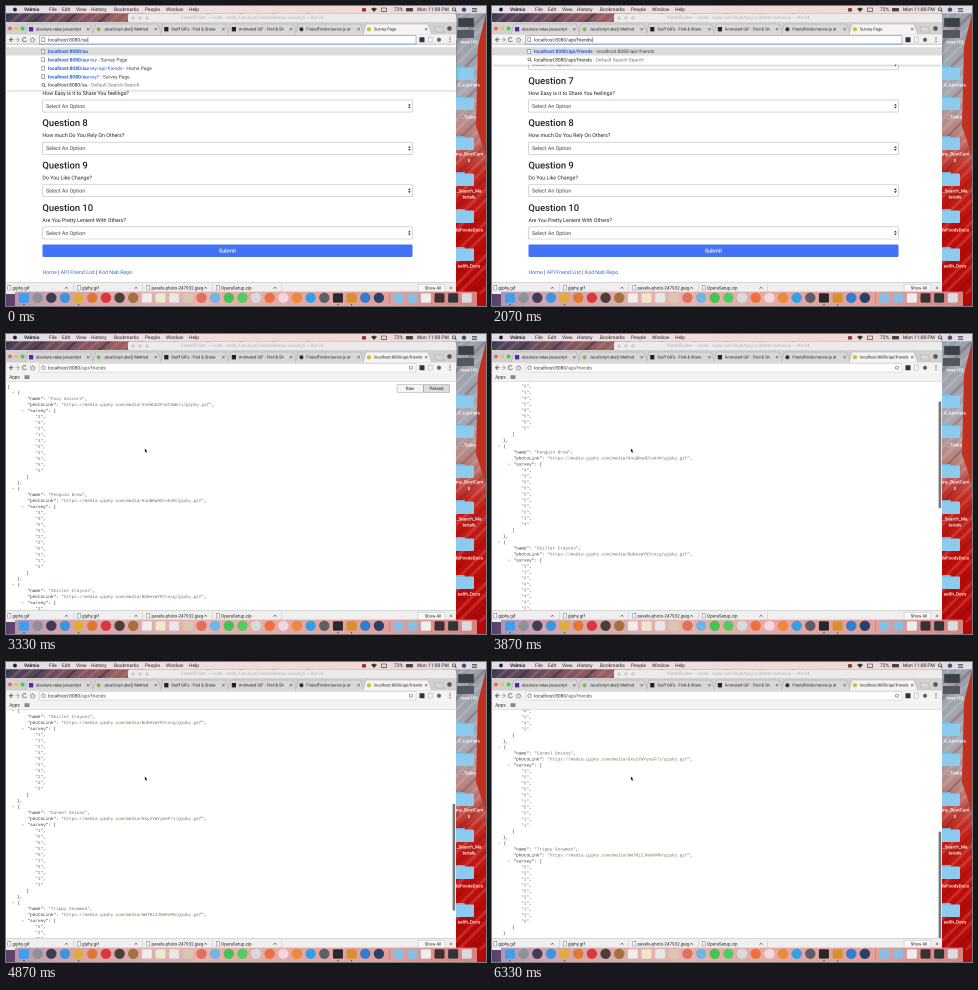
Animation of 480x300 px, one loop 6.39 s. Source, as an HTML page with a canvas:

```html
<!DOCTYPE html>
<html lang="en">
<head>
<meta charset="utf-8">
<title>Friend finder demo</title>
<style>
html, body { margin: 0; width: 100%; height: 100%; overflow: hidden; }
canvas { display: block; width: 480px; height: 300px; }
</style>
</head>
<body>
<canvas id="stage" width="960" height="600"></canvas>
<script>
const ctx = document.getElementById('stage').getContext('2d');
// Double resolution keeps the tiny text smooth.
ctx.scale(2, 2);
ctx.textRendering = 'geometricPrecision';
const LOOP = 6390, STEP = 1000 / 15;
const SANS = 'Roboto, sans-serif', MONO = '"Liberation Mono", monospace';
const HOST = 'localhost:8080/';
const BLUE = '#2f62d9', INK = '#222', STRING = '#6c7758';

function box(x, y, w, h, fill, stroke, radius = 0) {
  ctx.beginPath();
  ctx.roundRect(x, y, w, h, radius);
  if (fill) { ctx.fillStyle = fill; ctx.fill(); }
  if (stroke) { ctx.strokeStyle = stroke; ctx.lineWidth = 0.6; ctx.stroke(); }
}

function dot(x, y, r, fill) {
  ctx.fillStyle = fill;
  ctx.beginPath();
  ctx.arc(x, y, r, 0, 7);
  ctx.fill();
}

function ring(x, y, r, color, from = 0, to = 7) {
  ctx.strokeStyle = color;
  ctx.lineWidth = 0.7;
  ctx.beginPath();
  ctx.arc(x, y, r, from, to);
  ctx.stroke();
}

function path(points, stroke, width = 0.8, fill) {
  ctx.beginPath();
  points.forEach(([x, y]) => ctx.lineTo(x, y));
  if (fill) { ctx.fillStyle = fill; ctx.closePath(); ctx.fill(); }
  if (stroke) { ctx.strokeStyle = stroke; ctx.lineWidth = width; ctx.stroke(); }
}

function cross(x, y) {
  path([[x, y], [x + 2.4, y + 2.4]], '#666', 0.6);
  path([[x + 2.4, y], [x, y + 2.4]], '#666', 0.6);
}

// Linear gradient along x or y from [offset, color] stops.
function blend(w, h, stops) {
  const gradient = ctx.createLinearGradient(0, 0, w, h);
  stops.forEach(([offset, color]) => gradient.addColorStop(offset, color));
  return gradient;
}

// Draws text centred on y and returns the x where it ends.
function text(s, x, y, { size = 4.9, color = INK, weight = 400, font = SANS, align = 'left' } = {}) {
  ctx.font = `${weight} ${size}px ${font}`;
  ctx.fillStyle = color;
  ctx.textAlign = align;
  ctx.textBaseline = 'middle';
  ctx.fillText(s, x, y);
  return x + ctx.measureText(s).width;
}

function clip(x, y, w, h, draw) {
  ctx.save();
  ctx.beginPath();
  ctx.rect(x, y, w, h);
  ctx.clip();
  draw();
  ctx.restore();
}

// Last value whose step has been reached.
const at = (list, k) => list.reduce((value, [start, next]) => k >= start ? next : value, list[0][1]);

function between(list, k) {
  const i = list.findIndex(([start]) => start > k);
  if (i < 0) return list[list.length - 1][1];
  if (i === 0) return list[0][1];
  const [k0, v0] = list[i - 1], [k1, v1] = list[i];
  return v0 + (v1 - v0) * (k - k0) / (k1 - k0);
}

const TYPED = [[0, 'su'], [1, 's'], [2, ''], [6, 'a'], [7, 'ap'], [8, 'api'], [10, 'api/'], [22, 'api/f'],
  [28, 'api/fr'], [29, 'api/fri'], [30, 'api/frien'], [31, 'api/friends']];
const SCROLL = [[54, 0], [55, 4], [58, 42.5], [61, 97], [65, 167], [68, 192], [71, 202], [75, 202],
  [76, 206], [79, 238], [82, 254.5], [86, 259], [92, 261], [95, 261.5]];
const CLOSED = 37, LOADED = 39, POINTER = 45, SCROLLING = 55;

function desktop() {
  box(0, 0, 480, 300, blend(0, 300, [[0, '#96a0ac'], [0.28, '#a9a7b0'], [0.42, '#b98580'],
    [0.55, '#c3251d'], [0.75, '#c00d0a'], [1, '#b00707']]));
  box(0, 0, 140, 20, blend(140, 0, [[0, '#433e58'], [0.5, '#7d5262'], [1, '#a5655f']]));
  for (let i = 0; i < 30; i++) {
    const x = i * 11;
    path([[x - 8, 18], [x + 8, 4]], i % 3 ? '#e0908340' : '#2c2c4280', 2.5);
    path([[440, i * 11 + 14], [490, i * 11 - 36]], i % 3 ? '#ffffff22' : '#5a141433', 3);
  }
  path([[480, 8], [480, 150], [470, 120], [472, 40]], null, 0, '#c0301f');
  box(452, 12, 16, 9, '#3a3f48', '#777');
  box(451, 24, 17, 8, '#55575e');
  const labels = ['iews.HQ', '0_tutorials', '_Tasks', 'any_BootCam|p', '_Search_Ma|terials', 'deFoodsDocs', 'ealth_Docs'];
  const tops = [0, 60, 90, 130, 166, 203, 241], rows = [36, 79, 111, 148, 185, 224, 260];
  labels.forEach((label, i) => {
    if (i) {
      box(450, tops[i], 9, 4, '#73b9df', null, 1);
      box(449, tops[i] + 1.5, 19, 12.5, '#8ccbed', null, 1);
    }
    label.split('|').forEach((line, j) =>
      text(line, 463, rows[i] + j * 6, { size: 4.6, color: '#fff', weight: 500, align: 'center' }));
  });
}

function menuBar() {
  box(0, 0, 480, 7.3, blend(480, 0, [[0, '#e3dde6'], [0.3, '#efe0e2'], [0.7, '#f4d8d2'], [0.85, '#ecdadb'], [1, '#dfe0e8']]));
  dot(9, 3.5, 1.9, '#222');
  text('Velmio', 18, 3.8, { weight: 700 });
  const items = { File: 43, Edit: 56, View: 70, History: 85, Bookmarks: 108, People: 139, Window: 160, Help: 183 };
  for (const name in items) text(name, items[name], 3.8);
  box(356, 2, 4, 3.6, '#8c3a32', null, 1);
  path([[365, 2.8], [368, 1.5], [371, 2.8], [368, 6]], null, 0, '#333');
  box(375.5, 2, 5, 3.4, null, '#333');
  text('72%', 388, 3.8);
  box(400, 2, 7, 3.4, '#444', null, 0.6);
  text('Mon 11:08 PM', 411, 3.8);
  ring(448, 3.3, 1.5, '#333');
  path([[449, 4.4], [450.4, 5.8]], '#333');
  dot(458, 3.7, 2.2, '#454b80');
  for (let i = 0; i < 3; i++) box(466, 2 + i * 1.6, 5, 0.7, '#333');
}

function terminalTitle() {
  box(122, 7.6, 328, 9, '#eceaeb', null, 2);
  [127, 134, 141].forEach(x => dot(x, 12, 1.8, '#cfcdce'));
  text('FriendFinder — node - node /usr/local/bin/nodemon server.js — 80×24', 175, 11.8, { size: 4.6, color: '#b5b3b4' });
}

function tabs(title) {
  box(0, 16, 450, 13, '#d2d0d1', null, 2);
  ['#f6605a', '#f8bd3c', '#40c84c'].forEach((color, i) => dot(4 + i * 6.3, 22.5, 1.9, color));
  const titles = ['absolute value javascript', 'JavaScript abs() Method', 'Stuff GIFs - Find & Share', 'Animated GIF - Find & Sh',
    'FriendFinder/server.js at', title];
  const icons = ['#5d20b5', '#7fbd4a', '#222', '#222', '#333', '#cbbd35'];
  titles.forEach((name, i) => {
    const x = 20 + i * 67.6, active = i === 5;
    path([[x - 1, 28.6], [x + 2, 18], [x + 64, 18], [x + 68, 28.6]], '#aaa8a9', 0.5, active ? '#f5f4f5' : '#d9d7d8');
    if (i === 1 || i > 3) dot(x + 5, 23.2, 2, icons[i]);
    else box(x + 3, 21, 4.2, 4.4, icons[i]);
    text(name, x + 10, 23.4, { size: 4.1 });
    cross(x + 61, 22);
  });
  path([[428, 21], [436, 21], [438, 26], [430, 26]], '#aaa', 0.5, '#d9d7d8');
  dot(443.5, 22.5, 2.3, '#555');
}

function toolbar(address, focused) {
  box(0, 28.5, 450, 18.8, '#f4f3f4');
  path([[6, 31.5], [3.5, 33.7], [6, 36]], '#555');
  path([[3.5, 33.7], [7.5, 33.7]], '#555');
  path([[9.5, 33.7], [13.5, 33.7]], '#aaa');
  path([[11, 31.5], [13.5, 33.7], [11, 36]], '#aaa');
  ring(18.5, 33.7, 2.1, '#555', 0.4, 5.6);
  path([[24, 34], [26.5, 31.6], [29, 34], [28, 34], [28, 36], [25, 36], [25, 34]], '#777', 0.6);
  box(33.5, 29.4, 376.5, 8.7, '#fff', focused ? '#5b97e8' : '#ccc', 1);
  if (focused) pageIcon(37, 33.7);
  else ring(37.5, 33.7, 1.7, '#777');
  const end = text(HOST, 42, 34, { color: '#333' });
  const caret = text(address, end, 34, { color: focused ? INK : '#555' });
  if (focused) box(caret + 0.3, 31.3, 0.5, 5, '#333');
  else ring(405, 33.7, 1.5, '#777');
  box(413.5, 31.2, 5, 5, '#333', null, 0.6);
  box(422.5, 31.2, 3.6, 4.8, '#fff', '#aaa');
  dot(433, 33.7, 2, '#666');
  [31.7, 33.7, 35.7].forEach(y => dot(444, y, 0.6, '#555'));
  text('Apps', 3.2, 43.2, { size: 4.6 });
  box(18.5, 41.2, 5, 3.8, '#888', null, 0.6);
  box(0, 47, 450, 0.5, '#c8c8c8');
}

function pageIcon(x, y) {
  box(x - 1.2, y - 2, 2.8, 4, '#fff', '#777');
}

function suggestions(typed) {
  const match = HOST + typed;
  const search = [match, ' - Default Search Search', true];
  const friends = [HOST + 'api/friends', ' - localhost:8080/api/friends'];
  const rows = typed[0] === 'a' ? [friends, search] : [
    [match, ''], [HOST + 'survey', ' - Survey Page'], [HOST + 'survey/api/friends', ' - Home Page'],
    [HOST + 'survey?', ' - Survey Page'], search];
  ctx.save();
  ctx.shadowColor = '#0005';
  ctx.shadowBlur = 6;
  box(0, 39, 450, 8.45 * rows.length + 2.9, '#fff');
  ctx.restore();
  box(0, 41.2, 450, 8.3, '#dcdcdc');
  rows.forEach(([url, note, isSearch], i) => {
    const y = 45.5 + i * 8.45;
    let x = 42;
    if (isSearch) {
      ring(37.3, y - 0.6, 1.4, '#666');
      path([[38.3, y + 0.4], [39.7, y + 1.8]], '#666');
      x = text(url, x, y);
    } else {
      pageIcon(37, y - 0.2);
      x = text(url.slice(0, match.length), x, y, { color: BLUE, weight: 700 });
      x = text(url.slice(match.length), x, y, { color: BLUE });
    }
    text(note, x, y, { color: isSearch ? '#777' : '#444' });
  });
}

function surveyPage() {
  const labels = ['', 'How Easy is it to Share You feelings?', 'How much Do You Rely On Others?', 'Do You Like Change?',
    'Are You Pretty Lenient With Others?'];
  labels.forEach((label, i) => {
    const y = 32.8 + i * 42.3;
    text('Question ' + (6 + i), 36.4, y, { size: 9.4, weight: 500 });
    text(label, 36.4, y + 12.2, { size: 5.3 });
    box(36.6, y + 18.8, 369.8, 12.2, '#fff', '#b9bcc0', 1);
    text('Select An Option', 40, y + 25.2, { size: 5.3, color: '#444' });
    path([[402, y + 24.4], [403.4, y + 22.6], [404.8, y + 24.4]], null, 0, '#333');
    path([[402, y + 25.6], [403.4, y + 27.4], [404.8, y + 25.6]], null, 0, '#333');
  });
  box(36.5, 238.5, 370, 12.5, '#4272f5', null, 1.2);
  text('Submit', 221.5, 245.1, { size: 5.4, color: '#fff', weight: 500, align: 'center' });
  let x = 36.5;
  ['Home', 'API Friend List', 'Kod Nab Repo'].forEach((link, i) => {
    if (i) x = text(' | ', x, 266.3, { size: 5.3 });
    x = text(link, x, 266.3, { size: 5.3, color: '#3570c4' });
  });
}

const FRIENDS = [
  ['Foxy Unicorn', '3XAHUUZFxGtGWmli', '3421424552'],
  ['Penguin Brow', 'H4uBRwHDlnK4M', '4355225214'],
  ['Skillet Crayons', 'BUBesWYR7cnzg', '3124344242'],
  ['Carmel Onions', '6XuzYWYyeeF7i', '1555515211'],
  ['Trippy Snowman', 'mWTRi2JHeRVMH', '5212521124'],
];

function jsonPage(scroll) {
  const mono = (s, x, y, color = '#333') => text(s, x, y, { size: 4.33, color, font: MONO });
  const fold = (x, y) => path([[x, y - 0.7], [x + 1.8, y - 0.7], [x + 0.9, y + 0.8]], null, 0, '#aaa');
  const pair = (key, value, y) => mono(',', mono(`"${value}"`, mono(`"${key}": `, 21.5, y), y, STRING), y);
  const top = 52.9 - scroll;
  mono('[', 1.5, top);
  FRIENDS.forEach(([name, id, answers], i) => {
    const y = top + 6 + i * 96, last = i === FRIENDS.length - 1;
    fold(6.3, y);
    mono('{', 11.5, y);
    pair('name', name, y + 6);
    pair('photoLink', `https://media.giphy.com/media/${id}/giphy.gif`, y + 12);
    fold(16, y + 18);
    mono('"survey": [', 21.5, y + 18);
    [...answers].forEach((answer, j) => {
      const end = mono(`"${answer}"`, 29.3, y + 24 + j * 6, STRING);
      if (j < 9) mono(',', end, y + 24 + j * 6);
    });
    mono(']', 20.2, y + 84);
    mono(last ? '}' : '},', 11, y + 90);
  });
  box(391, 50.5 - scroll, 26.5, 8, '#f5f5f5', '#aaa', 1);
  box(417.5, 50.5 - scroll, 26, 8, '#dcdcdc', '#999', 1);
  text('Raw', 404, 54.7 - scroll, { size: 4.5, align: 'center' });
  text('Parsed', 430.5, 54.7 - scroll, { size: 4.5, align: 'center' });
}

function downloads() {
  box(0, 276, 450, 13, '#f0eff0');
  box(0, 276, 450, 0.5, '#bbb');
  ['giphy.gif', 'giphy.gif', 'pexels-photo-247932.jpeg', 'OperaSetup.zip'].forEach((file, i) => {
    const x = i * 69.5;
    box(x + 1.8, 279.6, 3, 4.4, '#fff', '#888');
    text(file, x + 6.5, 282, { size: 4.5 });
    path([[x + 59, 282.6], [x + 60.5, 281.2], [x + 62, 282.6]], '#666', 0.7);
    box(x + 67, 278, 0.5, 9, '#c3c3c3');
  });
  box(412, 278.2, 27, 8, '#f8f8f8', '#c5c5c5', 1);
  text('Show All', 427, 282.3, { size: 4.3, align: 'center' });
  cross(443.8, 280.7);
}

const APPS = ('#3d9ff0 #8d9198 #3f3a55 #3c96dc #e0ae35 #e27830 #d9373d #4a4038 #a5703b #f1ecec #f0e8cc #e7e7ea #d8c8b0 '
  + '#e0705a #6fb4e6 #46c354 #52cb61 #d5dbdd #f0703d #f2d5dd #ef8639 #34a0e9 #5c5f65 #26282d #d8902f #2f7fd0 #28406a '
  + '#83c0e4 #83c0e4 #eceef0 #3a3032 #2f3437 #d9dde2').split(' ');

function dock() {
  box(0, 288, 480, 12, blend(480, 0, [[0, '#4c4470'], [0.04, '#8a4a66'], [0.3, '#b8524f'], [1, '#b50a08']]));
  const glass = blend(480, 0, [[0, '#a894b4'], [0.1, '#d3a3ae'], [0.4, '#e6b3ae'], [0.8, '#e2a09c'], [1, '#d67f7c']]);
  box(9, 285.6, 462, 15, glass, null, 1);
  APPS.forEach((color, i) => {
    const x = 18 + i * 13.65 + (i > 26 ? 6 : 0);
    const square = i === 0 || (i > 8 && i < 13) || i === 23 || i === 24 || i > 26;
    if (square) box(x - 5, 287.2, 10, 9.4, color, null, 1.2);
    else dot(x, 291.8, 5.2, color);
    if ([0, 4, 23, 24].includes(i)) dot(x, 298.9, 0.6, '#222');
  });
  box(383, 287, 0.6, 11, '#a77');
}

function pointer(x, y) {
  path([[x, y], [x, y + 4.7], [x + 1, y + 3.8], [x + 1.8, y + 5.5], [x + 2.6, y + 5.1], [x + 1.9, y + 3.5], [x + 3.2, y + 3.4], [x, y]],
    '#fff', 0.5, '#111');
}

function draw(k) {
  const typed = at(TYPED, k), open = k < CLOSED, loaded = k >= LOADED, scroll = between(SCROLL, k);
  desktop();
  menuBar();
  terminalTitle();
  box(0, 16, 450, 272, '#fff');
  clip(0, 47, 450, 229, () => loaded ? jsonPage(scroll) : surveyPage());
  tabs(loaded ? HOST + 'api/friends' : 'Survey Page');
  toolbar(typed, open);
  if (open) suggestions(typed);
  if (k >= SCROLLING) box(446.6, 47.5 + scroll * 229 / 491, 2.6, 107, '#777', null, 1.3);
  downloads();
  dock();
  if (k >= POINTER) pointer(between([[45, 232], [50, 138.6]], k), between([[45, 62], [50, 114]], k));
}

function frame(now) {
  draw(Math.floor((now % LOOP + 4) / STEP));
  requestAnimationFrame(frame);
}
requestAnimationFrame(frame);
</script>
</body>
</html>
```
